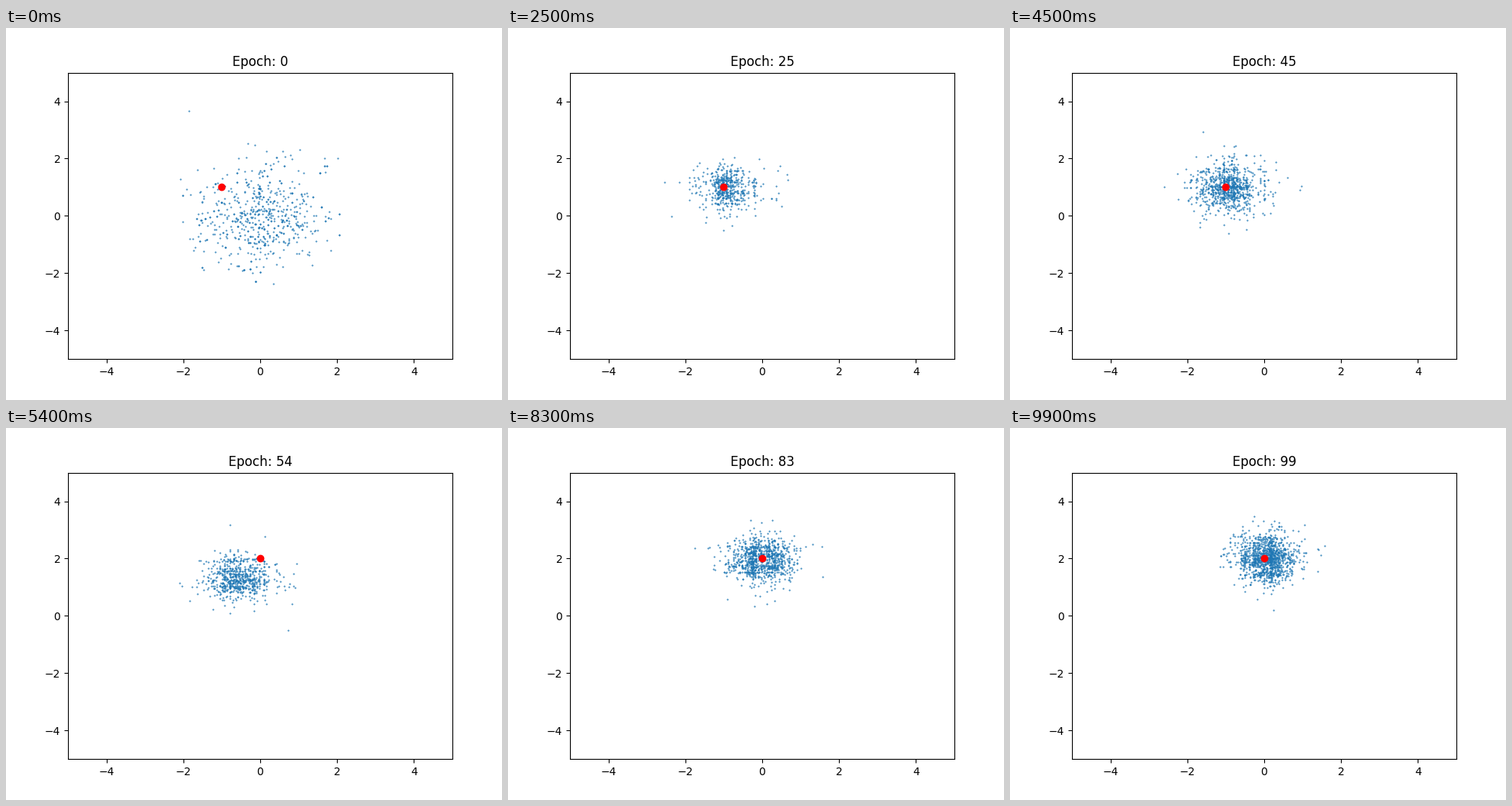
A matplotlib script for the animation above (10000 ms loop, 640 by 480 pixels).

```python
import numpy as np
import matplotlib.pyplot as plt
from matplotlib.animation import FuncAnimation

EPOCHS = 100
SHIFT_EPOCH = 50
FITNESS = 0.6          # strength of selection towards the goal
CROSS_RATE = 0.6
MUTATION_RATE = 0.15
MUTATION_STD = 0.4

rng = np.random.default_rng(7)


def goal(epoch):
    return np.array([-1.0, 1.0] if epoch < SHIFT_EPOCH else [0.0, 2.0])


def pop_size(epoch):
    """Grows steadily, but dips while the cloud travels to a new goal."""
    age = (epoch % SHIFT_EPOCH) / 12
    dip = (age * np.exp(1 - age)) ** 2
    return int((650 + 6 * epoch) * (1 - 0.7 * dip))


def first_population():
    pts = rng.normal(0, [0.9, 0.95], (520, 2))
    pts = pts[(np.abs(pts) < [2.1, 2.6]).all(axis=1)]
    pts -= pts.mean(axis=0)
    pts[0] = -1.85, 3.65    # lone stray above the cloud
    copies = rng.integers(len(pts), size=pop_size(0) - len(pts))
    return np.vstack([pts, pts[copies]])


def evolve(pop, epoch):
    size = pop_size(epoch)
    dist2 = ((pop - goal(epoch)) ** 2).sum(axis=1)
    weight = np.exp(-FITNESS * dist2 / 2)
    weight /= weight.sum()
    kids = pop[rng.choice(len(pop), size, p=weight)]
    mates = pop[rng.choice(len(pop), size, p=weight)]
    cross = rng.random(size) < CROSS_RATE
    kids[cross, 1] = mates[cross, 1]
    mutated = rng.random(kids.shape) < MUTATION_RATE
    return kids + mutated * rng.normal(0, MUTATION_STD, kids.shape)


history = [first_population()]
for epoch in range(1, EPOCHS):
    history.append(evolve(history[-1], epoch))

fig, ax = plt.subplots(figsize=(6.4, 4.8), dpi=100)
ax.set_xlim(-5, 5)
ax.set_ylim(-5, 5)
title = ax.set_title("Epoch: 0")
cloud, = ax.plot([], [], ".", color="tab:blue", markersize=1)
target, = ax.plot([], [], "ro")


def update(epoch):
    cloud.set_data(*history[epoch].T)
    target.set_data(*goal(epoch)[:, None])
    title.set_text(f"Epoch: {epoch}")
    return cloud, target, title


anim = FuncAnimation(fig, update, frames=EPOCHS, interval=100,
                     repeat=True, repeat_delay=0, blit=False)
plt.show()
```
